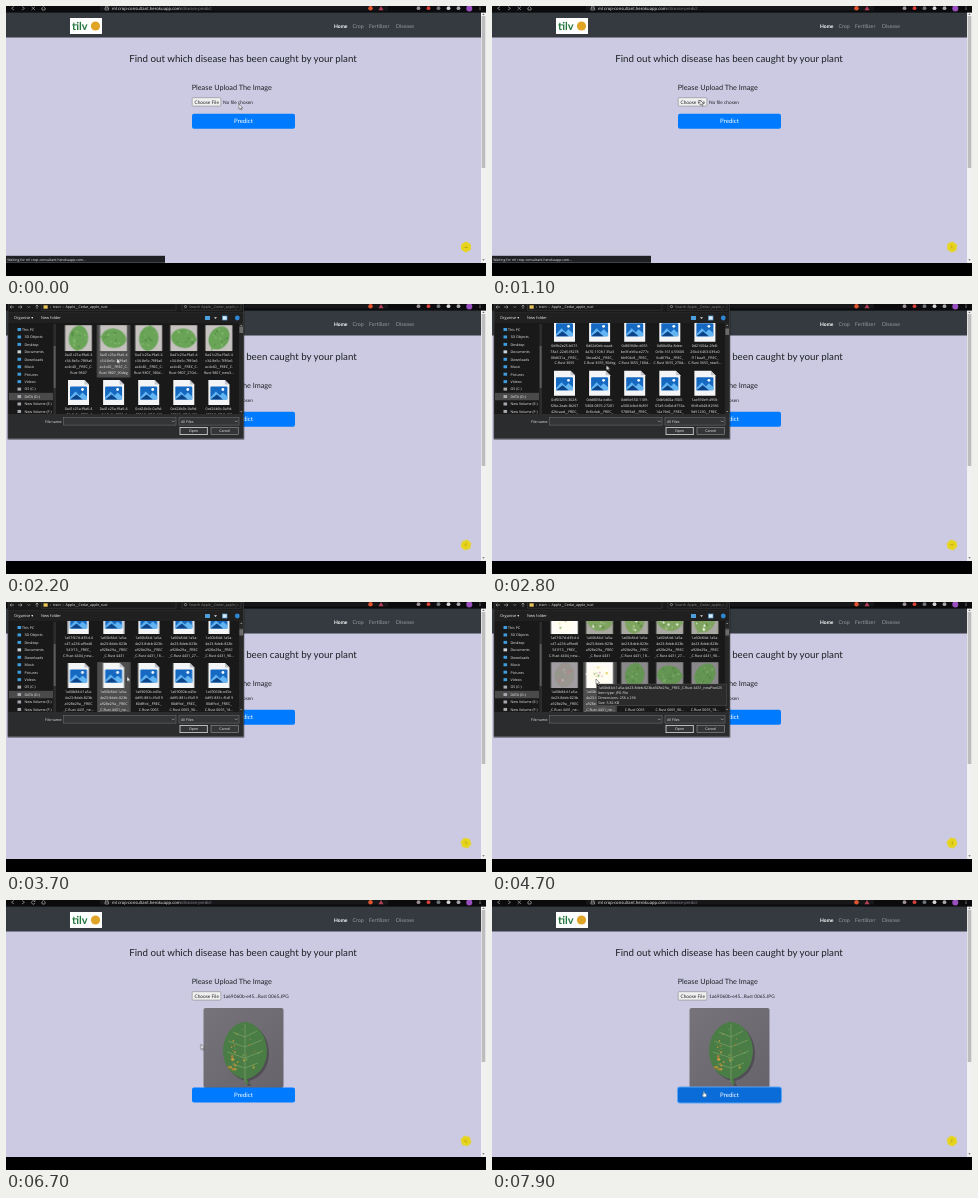
Animation, 480 px wide and 270 px high, one loop 8000 ms. Source, as an HTML page:

```html
<!DOCTYPE html>
<html lang="en">
<head>
<meta charset="utf-8">
<title>Plant disease upload</title>
<style>
html, body { margin: 0; width: 100%; height: 100%; overflow: hidden; background: #000; }
svg { display: block; width: 100vw; height: 100vh; }
text { font-family: Lato, "Open Sans", sans-serif; text-rendering: geometricPrecision; white-space: pre; }
.ui text, text.ui { font: 3.6px "Open Sans", "Noto Sans", sans-serif; fill: #eee; }
.line { fill: none; stroke: #bbb; stroke-width: .6; }

.hold { animation: 8s step-end infinite; }
.loading { animation-name: loading; }
.idle { animation-name: idle; }
.status { animation-name: status; }
.ghost { animation-name: ghost; }
.dialog { animation-name: dialog; }
.picked { animation-name: picked; }
.empty { animation-name: empty; }
.hover1 { animation-name: hover1; }
.hover2 { animation-name: hover2; }
.chosen { animation-name: chosen; }
.tip { animation-name: tip; }
.thumb { animation-name: thumb; }
.btn { animation-name: btn; }
.ring { animation-name: ring; }
.arrow { animation-name: arrow; }
.hand { animation-name: hand; }
@keyframes loading { 0% { opacity: 1 } 20.6% { opacity: 0 } 94.4% { opacity: 1 } }
@keyframes idle { 0% { opacity: 0 } 20.6% { opacity: 1 } 94.4% { opacity: 0 } }
@keyframes status { 0% { opacity: 1 } 19.4% { opacity: .5 } 20.6% { opacity: .2 } 21.9% { opacity: 0 } }
@keyframes ghost { 0% { opacity: 0 } 19.4% { opacity: 1 } 20.6% { opacity: 0 } }
@keyframes dialog { 0% { opacity: 0 } 20.6% { opacity: 1 } 76.9% { opacity: .6 } 78.1% { opacity: 0 } }
@keyframes picked { 0% { opacity: 0 } 79.4% { opacity: 1 } }
@keyframes empty { 0% { opacity: 1 } 79.4% { opacity: 0 } }
@keyframes hover1 { 0% { opacity: 0 } 26.2% { opacity: 1 } 31% { opacity: 0 } }
@keyframes hover2 { 0% { opacity: 0 } 43.1% { opacity: 1 } 61.9% { opacity: 0 } }
@keyframes chosen { 0% { opacity: 0 } 64.4% { opacity: 1 } }
@keyframes tip { 0% { opacity: 0 } 56.9% { opacity: 1 } 60.6% { opacity: 0 } }
@keyframes thumb { 0% { opacity: 0 } 50% { opacity: 1 } }
@keyframes btn { 0% { fill: #007bff } 90.6% { fill: #0a6cd8 } }
@keyframes ring { 0% { opacity: 0 } 93.1% { opacity: 1 } }
@keyframes arrow { 0% { opacity: 1 } 90.6% { opacity: 0 } }
@keyframes hand { 0% { opacity: 0 } 90.6% { opacity: 1 } }

.scroll { animation: scroll 8s ease-in-out infinite; }
@keyframes scroll {
  0%, 28.8% { transform: translateY(0) }
  32.5% { transform: translateY(-130px) }
  36.2% { transform: translateY(-320px) }
  40% { transform: translateY(-520px) }
  43.8%, 100% { transform: translateY(-663px) }
}
.knob { animation: knob 8s linear infinite; }
@keyframes knob { 0%, 28.8% { transform: translateY(0) } 43.8%, 100% { transform: translateY(4.5px) } }
.pointer { animation: pointer 8s ease-in-out infinite; }
@keyframes pointer {
  0% { transform: translate(233px, 98px) }
  8.75%, 14% { transform: translate(208px, 94px) }
  18.8%, 21.2% { transform: translate(216px, 95px) }
  26.9%, 31% { transform: translate(111px, 54.5px) }
  41%, 50% { transform: translate(121px, 74.5px) }
  55%, 60.6% { transform: translate(104px, 77px) }
  63.1%, 65.6% { transform: translate(144px, 78px) }
  71.2%, 79.4% { transform: translate(188px, 125.5px) }
  91.2%, 100% { transform: translate(212px, 191.5px) }
}
.badge { transform-origin: 460px 241px; animation: spin 6s linear infinite; }
@keyframes spin { to { transform: rotate(360deg) } }
</style>
</head>
<body>
<svg viewBox="0 0 480 270" preserveAspectRatio="none">
  <defs>
    <path id="leaf" d="M0-29C13-28 22-14 22 0C22 14 14 25 2 28L4 33L1 33L-1 28C-14 25-22 14-22 0C-22-14-13-28 0-29Z"/>
    <g id="sheet">
      <path d="M-10.5-12.5H6L10.5-8V12.5H-10.5Z" fill="#f4f5f7"/>
      <path d="M6-12.5V-8H10.5Z" fill="#c3c7cd"/>
      <rect x="-8.5" y="-6" width="17" height="13" rx="1" fill="#1669c1"/>
      <path d="M-8.5 5L-3-1L1 3L4 0L8.5 4V7H-8.5Z" fill="#63b5f2"/>
      <path d="M-8.5 7L-2 2L4 7Z" fill="#0d4489"/>
      <circle cx="4" cy="-3" r="1.4" fill="#fff"/>
    </g>
    <linearGradient id="slate" x2="1" y2="1">
      <stop stop-color="#77737b"/><stop offset="1" stop-color="#67636b"/>
    </linearGradient>
    <clipPath id="listBox"><rect x="51" y="19" width="181" height="91"/></clipPath>
    <clipPath id="sideBox"><rect x="2" y="20" width="48" height="90"/></clipPath>
    <clipPath id="square"><rect x="-13.5" y="-13" width="27" height="26"/></clipPath>
  </defs>

  <!-- page -->
  <rect y="4" width="480" height="253" fill="#cccae2"/>
  <rect y="6" width="475" height="25.5" fill="#343a40"/>
  <rect x="64" y="12" width="32" height="16" fill="#fff"/>
  <text x="66" y="23.5" font-size="11" font-weight="700" fill="#23763c">tilv</text>
  <circle cx="89.5" cy="20" r="4.6" fill="#e0a526"/>
  <g font-size="5.3" fill="#989b9f">
    <text x="328" y="21.7" font-size="5" font-weight="700" fill="#fff">Home</text>
    <text x="346.5" y="21.7">Crop</text>
    <text x="363" y="21.7">Fertilizer</text>
    <text x="390" y="21.7">Disease</text>
  </g>
  <rect x="475" y="6" width="5" height="251" fill="#f1f1f1"/>
  <rect x="475.7" y="10" width="3.6" height="152" fill="#bdbdbf"/>
  <path d="M476.3 9L477.5 7.5L478.7 9ZM476.3 253.3L477.5 254.8L478.7 253.3Z" fill="#666"/>
  <g fill="#1d2125">
    <text x="237" y="56.4" font-size="9.75" text-anchor="middle">Find out which disease has been caught by your plant</text>
    <text x="185.7" y="84" font-size="7.3">Please Upload The Image</text>
    <rect x="186.2" y="91.7" width="28.6" height="8.4" rx=".8" fill="#efefef" stroke="#767676" stroke-width=".5"/>
    <text x="188.5" y="97.6" font-size="4.75">Choose File</text>
    <text class="hold empty" x="217" y="97.6" font-size="4.75">No file chosen</text>
    <text class="hold picked" x="217" y="97.6" font-size="4.75">1a69060b-e45...Rust 0065.JPG</text>
  </g>
  <g class="hold empty">
    <rect x="186" y="107.8" width="103" height="14.9" rx="2" fill="#007bff"/>
    <text x="237.5" y="117.2" font-size="6.1" text-anchor="middle" fill="#fff">Predict</text>
  </g>
  <g class="hold picked">
    <g id="photo">
      <rect x="197.5" y="108" width="80" height="80" rx="2" fill="url(#slate)"/>
    </g>
    <rect class="hold ring" x="185" y="186.5" width="105" height="17" rx="3" fill="#5ba3f3"/>
    <rect class="hold btn" x="186" y="187.5" width="103" height="15" rx="2"/>
    <text x="237.5" y="196.9" font-size="6.1" text-anchor="middle" fill="#fff">Predict</text>
  </g>
  <g class="badge">
    <path d="M460 236L464.3 238.5V243.5L460 246L455.7 243.5V238.5Z" fill="#e6d51c" stroke="#e6d51c" stroke-linejoin="round"/>
    <path d="M458 241.5H462M460 239.5V240.3" stroke="#b99f16" stroke-width=".7"/>
  </g>
  <g class="hold status">
    <rect y="249.8" width="159" height="7" fill="#1f2023"/>
    <text class="ui" x="1.2" y="254.6" style="font-size:3.5px">Waiting for ml crop-consultant.herokuapp.com...</text>
  </g>

  <!-- browser bar -->
  <rect width="480" height="6.6" fill="#0b0b0d"/>
  <rect x="94" width="288" height="4.6" fill="#17171a"/>
  <path class="line" d="M8 .5L5.5 2.3L8 4M16 .5L18.5 2.3L16 4M35.5 2.2L37.5 .5L39.5 2.2M36 2V4H39V2"/>
  <path class="line hold loading" d="M25.5 .6L29 4M29 .6L25.5 4"/>
  <path class="line hold idle" d="M28.8 1.4A1.8 1.8 0 1 0 29 3M29 .4V1.6H27.7"/>
  <path class="line" d="M99.5 2V1.2A1.2 1.2 0 0 1 102 1.2V2M99 2H102.5V4H99Z"/>
  <text class="ui" x="106" y="3.7" style="font-size:4.2px">ml crop-consultant.herokuapp.com<tspan fill="#85858a">/disease-predict</tspan></text>
  <circle cx="364.5" cy="2.2" r="2.2" fill="#e2532f"/>
  <path d="M372.5 4.2L375 0L377.5 4.2Z" fill="#b5405a"/>
  <g id="tools"></g>
  <path d="M474 .6V4" stroke="#bbb" stroke-width=".8" stroke-dasharray=".8 .5"/>

  <!-- dialog while opening -->
  <g class="hold ghost">
    <rect x="3" width="233" height="25" fill="#f6f5f6" opacity=".83"/>
    <rect x="4" y="25" width="227.5" height="84" fill="#efefef" opacity=".76"/>
    <path d="M231.5 25H236.5V134H3V109H231.5Z" fill="#48494d" opacity=".87"/>
    <path d="M40 114H56.5V119H40ZM58 113H170V120H58ZM173 113H231.5V120H173ZM173 122.3H201V130H173ZM204 122.3H231.5V130H204ZM231.5 104H236V109H231.5ZM231.5 129H236V134H231.5Z" fill="#f0f0f2"/>
    <rect x="186" y="109" width="50" height="13.5" fill="#1d74d2" opacity=".4"/>
  </g>

  <!-- file dialog -->
  <g class="ui hold dialog">
    <rect x="1.5" width="237" height="136" rx="1" fill="#000" opacity=".35"/>
    <rect x="2" width="235.5" height="134.5" fill="#2b2c2e"/>
    <rect x="2" width="235.5" height="8" fill="#1a1a1b"/>
    <path class="line" d="M8 3H4M5.5 1.6L4 3L5.5 4.4M12 3H16M14.5 1.6L16 3L14.5 4.4M21.5 2.3L22.8 3.6L24 2.3M31 5V1M29.6 2.5L31 1L32.4 2.5"/>
    <path d="M35.5-1V6.3H170V-1M176-1V6.3H235V-1" fill="none" stroke="#444" stroke-width=".5"/>
    <rect x="37.5" y="1.3" width="4.2" height="3.4" fill="#e9c25a"/>
    <text x="44" y="4.3">›  train  ›  Apple__Cedar_apple_rust</text>
    <text x="183" y="4.3" style="fill:#8b8b8b">Search Apple__Cedar_apple_r...</text>
    <circle cx="179.5" cy="2.6" r="1.1" class="line"/>
    <rect x="2" y="8.5" width="235.5" height="10.5" fill="#202020"/>
    <text x="8" y="15.4" style="font-size:3.9px">Organise ▾</text>
    <text x="35" y="15.4" style="font-size:3.9px">New folder</text>
    <rect x="199" y="12" width="5" height="4" fill="#4c9fdc"/>
    <path d="M208 13.3H211L209.5 15Z" fill="#ddd"/>
    <rect x="216.5" y="12" width="4.5" height="4" fill="#dfeaf3" stroke="#4c9fdc" stroke-width=".7"/>
    <circle cx="231.3" cy="14" r="2.4" fill="#2f86d3"/>
    <rect x="2" y="19" width="235.5" height="91" fill="#191919"/>
    <g id="side" clip-path="url(#sideBox)"></g>
    <rect x="47.3" y="20" width="2.7" height="90" fill="#2c2c2c"/>
    <rect x="47.7" y="42" width="1.9" height="42" fill="#5c5c5c"/>
    <g clip-path="url(#listBox)"><g id="list" class="scroll"></g></g>
    <rect x="233" y="19" width="4.5" height="91" fill="#272727"/>
    <path d="M234.1 22L235.2 20.8L236.3 22ZM234.1 107L235.2 108.2L236.3 107Z" fill="#999"/>
    <rect class="knob" x="233.4" y="22.5" width="3.7" height="6.5" fill="#6c6c6c"/>
    <text x="39" y="118.5">File name:</text>
    <g fill="#343537" stroke="#777" stroke-width=".5">
      <rect x="57.5" y="113.7" width="112.5" height="7.4"/>
      <rect x="173" y="113.7" width="60" height="7.4"/>
      <rect x="174" y="123.4" width="27.3" height="7.2" stroke="#ddd" stroke-width=".8"/>
      <rect x="205" y="123.4" width="27.5" height="7.2" stroke="#aaa"/>
    </g>
    <path class="line" d="M166 116.7L167.3 118L168.6 116.7M229 116.7L230.3 118L231.6 116.7"/>
    <text x="175" y="118.6">All Files</text>
    <text x="187.6" y="128.3" text-anchor="middle">Open</text>
    <text x="218.7" y="128.3" text-anchor="middle">Cancel</text>
    <text class="hold chosen" x="59.5" y="118.6">1a69060b-e45e-4d95-881c-f6d1980dffcd___FREC_C.Rust 0065</text>
    <g class="hold tip">
      <rect x="104.5" y="82" width="130" height="21.8" fill="#2b2b2b" stroke="#606060" stroke-width=".4"/>
      <text x="106" y="86.5">1a60b84d-1a5a-4e23-8deb-823ba928e29a__FREC_C.Rust 4431_newPixel25</text>
      <text x="106" y="91.6">Item type: JPG File</text>
      <text x="106" y="96.7">Dimensions: 256 x 256</text>
      <text x="106" y="101.8">Size: 5.82 KB</text>
    </g>
    <rect x="2" y="0" width="235.5" height="134.5" fill="none" stroke="#4a4a4a" stroke-width=".5"/>
  </g>

  <g class="pointer">
    <path class="hold arrow" d="M0 0V5.2L1.3 4.1L2.2 6L3 5.6L2.1 3.8H3.7Z" fill="#fff" stroke="#111" stroke-width=".4"/>
    <path class="hold hand" d="M-.7 .2Q0-.6 .6 .2V2L2.6 2.6V4.4L1.9 5.6H-.7L-2 3.4L-1.5 2.8L-.7 3.4Z" fill="#fff" stroke="#123" stroke-width=".35"/>
  </g>
</svg>
<script>
const $ = id => document.getElementById(id);
const add = (id, html) => $(id).insertAdjacentHTML("beforeend", html);
let seed = 7;
const rnd = () => (seed = seed * 16807 % 2147483647) / 2147483647;
const hex = n => Array.from({ length: n }, () => Math.floor(rnd() * 16).toString(16)).join("");

// scattered dots inside an oval
function dots(n, rx, ry, size, colors) {
  let out = "";
  for (let i = 0; i < n; i++) {
    const a = rnd() * 6.283, d = Math.sqrt(rnd());
    out += `<circle cx="${(Math.cos(a) * d * rx).toFixed(1)}" cy="${(Math.sin(a) * d * ry).toFixed(1)}" r="${(size * (.5 + rnd())).toFixed(2)}" fill="${colors[i % colors.length]}"/>`;
  }
  return out;
}

["#9a8f94", "#d8403c", "#6f7478", "#d5d6d8", "#a5a6aa"].forEach((c, i) =>
  add("tools", `<circle cx="${412.5 + i * 10}" cy="2.2" r="1.9" fill="${c}"/>`));
add("tools", '<circle cx="463.3" cy="2.4" r="3" fill="#9a4fc0"/>');

const places = ["This PC", "3D Objects", "Desktop", "Documents", "Downloads", "Music", "Pictures", "Videos", "OS (C:)", "DATA (D:)", "New Volume (E:)", "New Volume (F:)"];
places.forEach((name, i) => {
  const y = 25.5 + i * 7.45;
  if (i === 9) add("side", `<rect x="3" y="${y - 3.7}" width="44" height="7.4" fill="#4a4a4a"/>`);
  add("side", `<rect x="11.5" y="${y - 1.5}" width="3.6" height="3" fill="${i > 7 ? "#a5a8ad" : i === 3 ? "#c9d2da" : "#3f9bdc"}"/>
    <text x="${i ? 18.5 : 16}" y="${y + 1.3}">${name}</text>`);
});

const looks = {
  fresh: ["#c5c2c0", "#6aa457", ["#83b96c", "#558f48"]],
  pale: ["#aaa8a2", "#7fa45f", ["#f4f6ea", "#5f8a45", "#fff", "#a9c487"]],
  burnt: ["#fdfcf8", "#fffdf0", ["#fff", "#dccb4a", "#e3a3c4", "#86ab62"]],
  faded: ["#a19da2", "#999690", ["#b58484", "#8aa07c", "#bdb8b0"]],
  dark: ["#8b888b", "#649553", ["#7cab66", "#568747"]]
};

function thumb(look, angle, start) {
  const [back, leaf, spots] = looks[look];
  return `<g transform="translate(0 -1.8)"><g class="hold thumb" clip-path="url(#square)" style="animation-delay:${start - 4000}ms">
    <rect x="-13.5" y="-13" width="27" height="26" fill="${back}"/>
    <g transform="rotate(${angle})"><use href="#leaf" transform="scale(.44)" fill="${leaf}"/>${dots(14, 8, 10, .9, spots)}</g></g></g>`;
}

const ids = {
  a: ["0a41c25a-f9a6-4", "c34-8e5c-7f89a6", "ac4c40__FREC_C."],
  b: ["0cd24b0c-0a9d-", "483f-8a37-5c6f1", "f6f02__FREC_C."],
  c: ["1a67f47d-d35d-4", "c47-a236-af9ed6", "541f13__FREC_"],
  d: ["1a60b84d-1a5a-", "4e23-8deb-823b", "a928e29a__FREC"],
  e: ["1a69060b-e45e-", "4d95-881c-f6d19", "80dffcd__FREC_"]
};
const turns = ["", "_90deg", "_180d...", "_270d...", "_new3..."];
const angles = [8, 98, 188, 278, 35];
const last = 12;

function cellInfo(row, col) {
  if (row === 0) return [ids.a, "Rust 9807" + turns[col], "fresh", 1900 + col * 40];
  if (row === 1) return [col < 2 ? ids.a : ids.b, "Rust 9807" + turns[col]];
  if (row === last) return col
    ? [ids.d, "_C.Rust 4431" + ["", "_18...", "_27...", "_90..."][col - 1], "pale", 4060 + col * 60]
    : [ids.c, "C.Rust 4404_new...", "burnt", 4050];
  if (row === last + 1) return col < 2
    ? [ids.d, "_C.Rust 4431_ne...", col ? "burnt" : "faded", 4350 + col * 60]
    : [ids.e, "C.Rust 0065" + ["", "_90...", "_18..."][col - 2], "dark", 4350 + col * 60];
  const id = row + col > 9 ? "1a" : "0d";
  return [[id + hex(6) + "-" + hex(4) + "-", hex(4) + "-" + hex(4) + "-" + hex(5), hex(7) + "__FREC_"], "C.Rust " + (3000 + row * 131) + turns[col]];
}

for (let row = 0; row <= last + 1; row++) for (let col = 0; col < 5; col++) {
  const [lines, end, look, start] = cellInfo(row, col);
  const x = 72.5 + col * 35.1, y = 36 + row * 54;
  const mark = (cls, fill) => `<rect class="hold ${cls}" x="-16.7" y="-15" width="33.4" height="52.5" fill="${fill}"/>`;
  let html = "";
  if (row === 0 && col === 1) html += mark("hover1", "#4d4d4d");
  if (row > last && col === 1) html += mark("hover2", "#4d4d4d");
  if (row > last && col === 2) html += mark("chosen", "#747474");
  html += look
    ? `<g class="hold thumb" style="animation-delay:${start - 8000}ms"><use href="#sheet" y="-1.5"/></g>` + thumb(look, angles[col], start)
    : '<use href="#sheet" y="-1.5"/>';
  [...lines, end].forEach((t, i) =>
    html += `<text x="0" y="${(16.3 + i * 5.8).toFixed(1)}" text-anchor="middle">${t}</text>`);
  add("list", `<g transform="translate(${x.toFixed(1)} ${y})">${html}</g>`);
}

add("photo", `<g transform="translate(239 151)">
  <use href="#leaf" x="2" y="2" fill="#504d54"/><use href="#leaf" fill="#4a7d45"/>
  <path d="M0-27V31M0-14L12-20M0-14L-12-19M0-4L17-11M0-4L-17-10M0 7L18 0M0 7L-18 1M0 17L13 12M0 17L-13 13" fill="none" stroke="#7da267" stroke-width=".7"/>
  ${dots(22, 18, 22, .8, ["#b79a45", "#8d7c3c", "#6c9a52"])}
  <g transform="translate(-12 12)">${dots(9, 7, 9, 1.1, ["#c09a3e", "#a3813a"])}</g></g>`);
</script>
</body>
</html>
```
